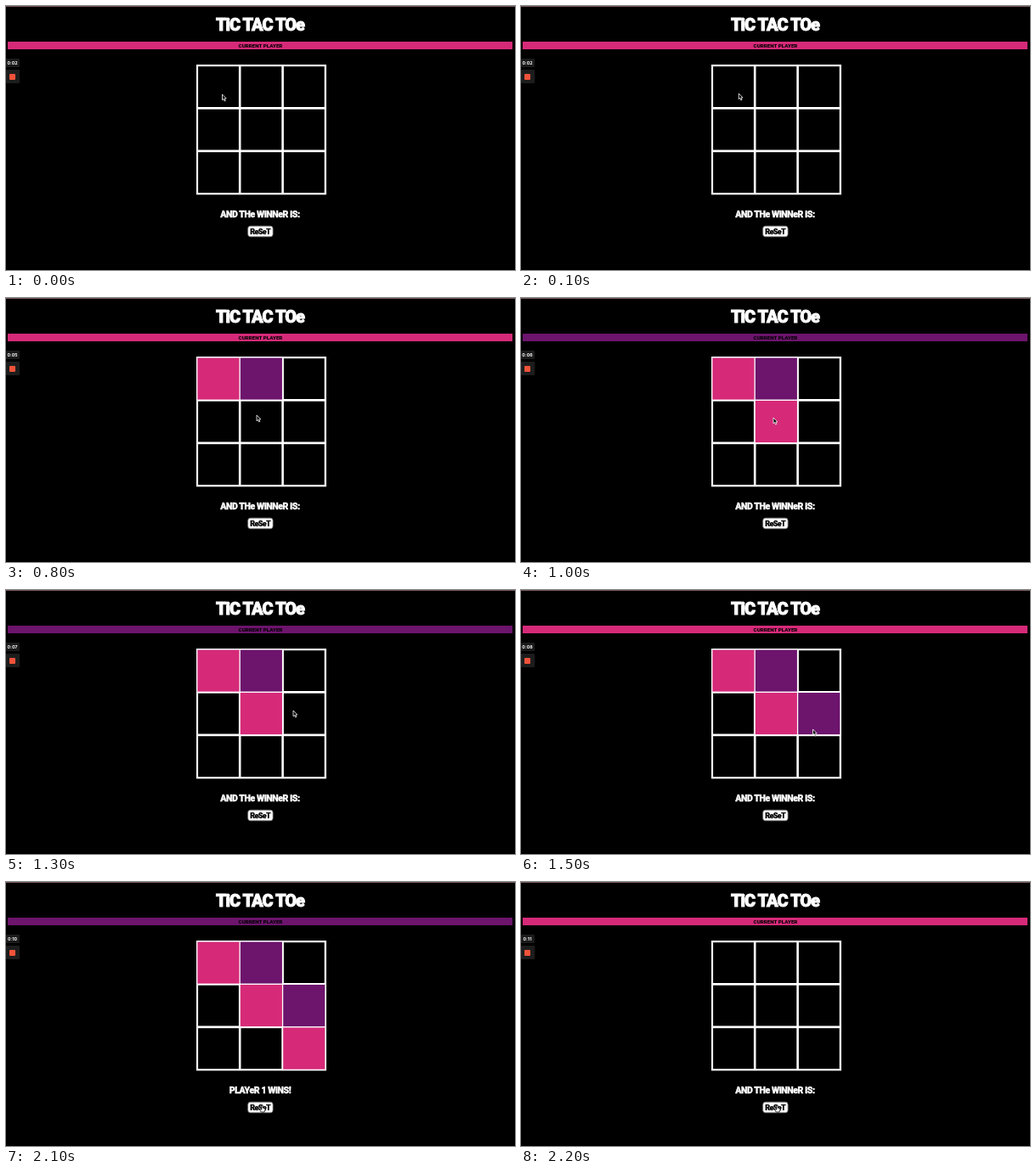
Recreate the animation shown at these times as an HTML page. Size 599 px wide and 311 px high, loop 2.3 s.

```html
<!DOCTYPE html>
<html lang="en">
<head>
<meta charset="utf-8">
<title>Tic Tac Toe</title>
<style>
  html, body { margin: 0; width: 100%; height: 100%; overflow: hidden; background: #000; }
  svg { display: block; width: 599px; height: 311px; }
  text { font-family: Roboto, "Open Sans", sans-serif; font-weight: 900; text-anchor: middle; }
  .light { fill: #fff; stroke: #fff; }
  #title { font-size: 20px; letter-spacing: -1px; stroke-width: .9; }
  #turn { font-size: 6.2px; }
  #result { font-size: 10.5px; letter-spacing: -.4px; stroke-width: .4; }
  #reset { font-size: 9px; letter-spacing: -.6px; stroke: #000; stroke-width: .2; }
  #clock { font: 700 5.3px Inter, sans-serif; fill: #fff; }
  #arrow, #hand { stroke-linejoin: round; stroke-width: .8; }
</style>
</head>
<body>
<svg viewBox="0 0 599 311">
  <rect width="599" height="311"/>
  <rect width="599" height="1" fill="#79595a"/>
  <text id="title" class="light" x="299" y="29.3">TiC TAC TOe</text>

  <rect id="bar" x="2" y="42" width="594" height="9"/>
  <text id="turn" x="299.5" y="48.8">CURRENT PLAYER</text>

  <rect y="62" width="16" height="10" rx="1" fill="#1b1b1b"/>
  <text id="clock" x="7.5" y="68.7"></text>
  <rect y="75" width="16" height="16" rx="1" fill="#1d1d1d"/>
  <rect x="4" y="80" width="7" height="7" rx="1" fill="#f0523a"/>

  <rect x="224" y="69" width="153" height="153.3" fill="#fff"/>
  <g id="board"></g>

  <text id="result" class="light" x="299" y="248.7"></text>
  <rect x="284.7" y="259.2" width="29.4" height="12.6" rx="3" fill="#fff" stroke="#777" stroke-width=".8"/>
  <text id="reset" x="299.2" y="268.9">ReSeT</text>

  <g id="cursor">
    <path id="arrow" d="M0 0V6.8L1.5 5.4L2.6 8L3.8 7.5L2.7 5H4.8Z" stroke="#fff"/>
    <path id="hand" d="M-.7 0H.7V3L3.4 3.8V6L2.5 8H-1.2L-3 5L-2.2 4.2L-.7 5.2Z" fill="#fff" stroke="#000"/>
  </g>
</svg>
<script>
const LOOP = 2300, STEP = 100, PINK = "#d62a79", PURPLE = "#6d146d";
const RESET = 2200, ON_BUTTON = 2000;

// Moves as [time, cell]; players alternate, pink first.
const moves = [[200, 0], [600, 1], [1000, 4], [1400, 5], [1600, 8]];

// Pointer tip as [time, x, y].
const path = [
  [0, 254.5, 104], [200, 258, 102], [400, 288, 99], [600, 294.5, 103],
  [800, 295, 138], [1000, 297, 141], [1300, 338, 142], [1400, 341, 143],
  [1600, 346, 185], [1700, 345, 188], [2000, 301.5, 263], [LOOP, 301.5, 263]
];

const el = id => document.getElementById(id);
const set = (node, attrs) => {
  for (const key in attrs) node.setAttribute(key, attrs[key]);
};
const playerColor = n => n % 2 ? PURPLE : PINK;

const cells = Array.from({ length: 9 }, () =>
  el("board").appendChild(document.createElementNS("http://www.w3.org/2000/svg", "rect")));

function drawCell(cell, i, color) {
  const inset = color ? 0 : .7, size = color ? 49.1 : 47.8;
  set(cell, {
    x: 225.4 + i % 3 * 50.4 + inset,
    y: 70.5 + Math.floor(i / 3) * 50.5 + inset,
    width: size, height: size, fill: color || "#000"
  });
}

function pointerAt(t) {
  const i = path.findIndex(p => p[0] > t);
  const [t0, x0, y0] = path[i - 1], [t1, x1, y1] = path[i];
  const k = (t - t0) / (t1 - t0);
  return [x0 + (x1 - x0) * k, y0 + (y1 - y0) * k];
}

function draw(now) {
  const t = Math.floor(now % LOOP / STEP) * STEP;
  const played = t < RESET ? moves.filter(m => m[0] <= t) : [];

  cells.forEach((cell, i) => {
    const n = played.findIndex(m => m[1] === i);
    drawCell(cell, i, n < 0 ? null : playerColor(n));
  });
  set(el("bar"), { fill: playerColor(played.length) });
  el("result").textContent =
    played.length === moves.length ? "PLAYeR 1 WiNS!" : "AND THe WiNNeR iS:";

  // The recorded clock runs four times as fast as the loop.
  const seconds = Math.floor(2.3 + t / 250);
  el("clock").textContent = "0:" + String(seconds).padStart(2, "0");

  set(el("cursor"), { transform: `translate(${pointerAt(t)})` });
  const onButton = t >= ON_BUTTON;
  el("arrow").style.display = onButton ? "none" : "";
  el("hand").style.display = onButton ? "" : "none";
}

const start = performance.now();
function frame() {
  draw(performance.now() - start);
  requestAnimationFrame(frame);
}
frame();
</script>
</body>
</html>
```
